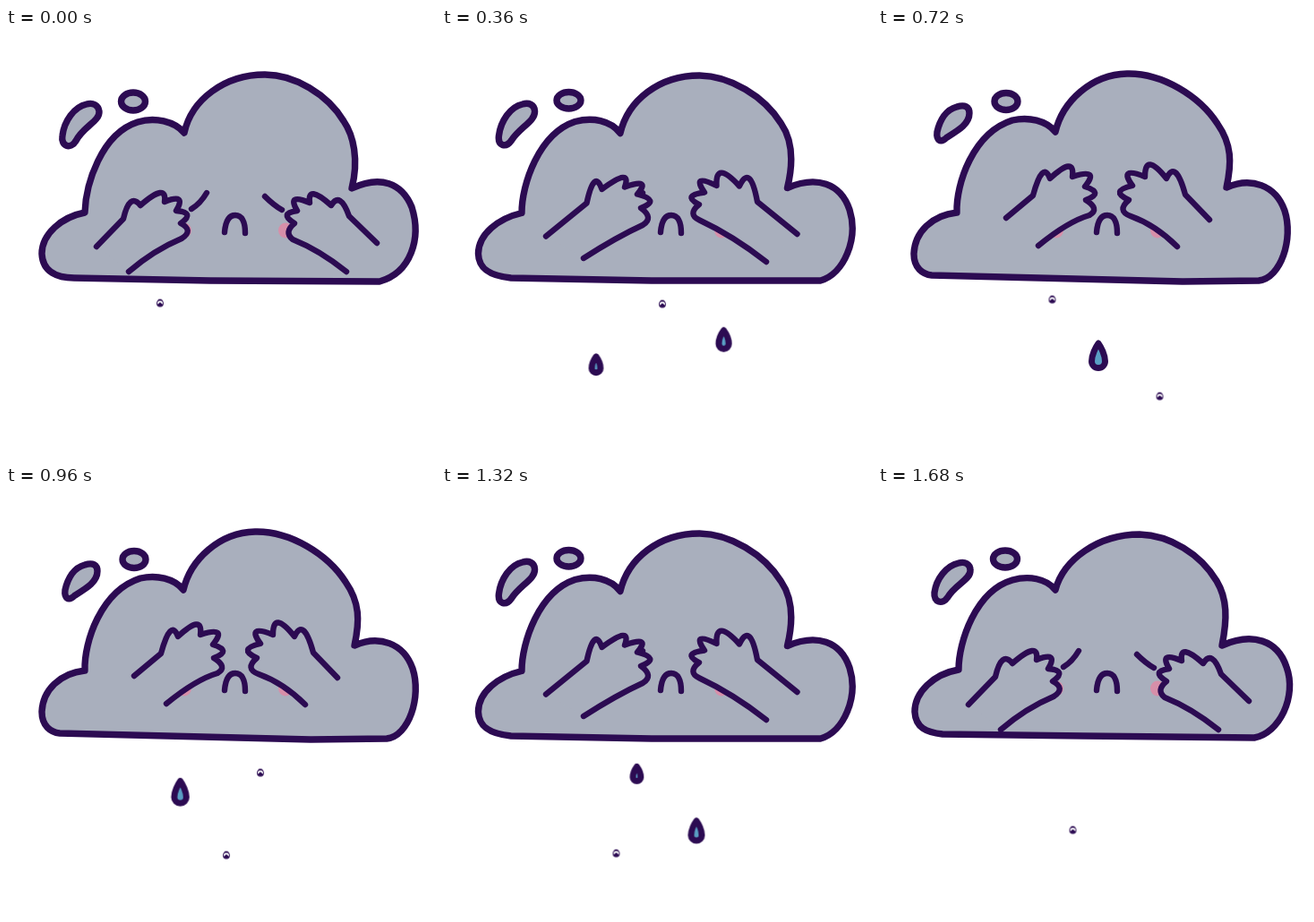
Animation, 480 px wide and 480 px high, one loop 1.74 s. Source, as an HTML page without scripts:

```html
<!DOCTYPE html>
<html lang="en">
<head>
<meta charset="utf-8">
<title>Crying cloud</title>
<style>
html, body { margin: 0; width: 100%; height: 100%; overflow: hidden; background: #fff; }
svg { display: block; width: 100%; height: 100%; }

path { fill: #a9afbd; stroke: #2c0b52; stroke-width: 6.4; stroke-linecap: round; stroke-linejoin: round; }
.cloud { stroke-width: 7.4; animation: wobble 1740ms steps(2) infinite; }
.arms { animation: rub 1740ms steps(2) infinite; }
.line { fill: none; }
.blush { fill: #d78fa9; }

/* Two drawings per key pose: 120 ms each */
@keyframes wobble {
  0% { d: path("M88 206C89 175 106 118 147 105C166 99 188 104 199 117C207 80 244 52 289 52C322 52 359 74 377 104C388 120 394 147 386 179C418 164 442 173 453 200C464 235 452 273 417 283L228 282L76 279C58 279 41 273 40 252C40 230 62 211 88 206ZM104 93C105 104 86 110 78 126C72 136 61 132 63 120C65 104 76 88 90 85C97 83 103 86 104 93ZM128.5 82A13.5 10 0 1 1 155.5 82A13.5 10 0 1 1 128.5 82Z"); }
  13.793%, 82.758% { d: path("M88 207C88 175 108 117 147 105C166 100 186 102 198 117C207 80 244 52 290 52C322 53 359 74 377 104C389 122 394 148 385 179C418 164 446 173 456 204C466 235 448 273 420 282L240 280L78 279C56 277 42 271 41 252C41 230 62 212 88 207ZM104 93C105 104 86 110 78 126C72 136 61 132 63 120C65 104 76 88 90 85C97 83 103 86 104 93ZM128.5 81.5A13.5 9.5 0 1 1 155.5 81.5A13.5 9.5 0 1 1 128.5 81.5Z"); }
  27.586%, 68.965% { d: path("M90 206C90 174 108 119 150 104C170 99 190 104 200 118C208 82 240 54 285 54C321 54 360 78 380 109C392 126 392 148 386 178C418 165 444 173 454 202C464 235 450 276 425 282L228 284L76 279C56 277 40 270 40 252C40 230 64 213 90 206ZM103 92C104 104 87 112 77 125C70 133 63 131 64 120C66 104 76 88 90 85C97 83 103 85 103 92ZM127.5 80A13.5 9 0 1 1 154.5 80A13.5 9 0 1 1 127.5 80Z"); }
  41.379%, 55.172% { d: path("M88 206C87 174 106 117 150 103C168 99 188 103 198 116C206 82 238 52 278 51C317 50 359 76 379 107C395 130 395 150 389 178C416 166 444 175 454 204C464 235 450 279 425 282L340 283L60 276C50 275 40 268 40 252C41 228 60 209 88 206ZM102 95C102 107 90 114 77 122C69 130 65 124 66 116C69 103 76 91 88 88C97 85 102 88 102 95ZM130 82A13 9.5 0 1 1 156 82A13 9.5 0 1 1 130 82Z"); }
  96.551%, 100% { d: path("M90 205C90 174 109 117 150 105C168 100 188 103 198 116C207 82 246 54 292 54C326 55 360 76 378 106C390 126 390 148 384 178C418 163 446 172 456 202C468 235 448 276 420 281L230 279L72 277C54 275 42 270 41 252C41 230 62 210 90 205ZM103 94C104 104 86 110 78 124C72 133 62 130 63 119C65 104 76 89 90 86C97 84 103 87 103 94ZM128.5 81.5A13.5 9.5 0 1 1 155.5 81.5A13.5 9.5 0 1 1 128.5 81.5Z"); }
}

@keyframes rub {
  0%, 96.551%, 100% { d: path("M101 244L131 213Q138 183 150 198Q180 172 177 194Q202 184 190 204Q212 206 195 218Q210 226 196 235Q165 248 137 272M414 240L383 210Q373 182 363 198Q336 174 339 195Q313 184 325 204Q304 207 322 218Q310 228 320 236Q350 248 380 272"); }
  13.793%, 82.758% { d: path("M102 243L148 207Q156 166 165 192Q204 168 191 189Q218 178 205 194Q234 201 212 210Q226 222 212 231Q176 248 138 272M412 239L362 201Q356 156 342 185Q312 156 315 186Q288 170 302 191Q276 192 294 202Q281 212 293 219Q340 242 380 273"); }
  27.586%, 68.965% { d: path("M130 222L175 184Q184 147 192 168Q220 142 217 166Q250 156 231 177Q255 184 232 192Q248 202 236 209Q215 218 178 242M381 221L342 187Q332 146 322 168Q298 138 298 166Q268 154 284 176Q258 182 280 192Q266 204 282 210Q310 222 344 249"); }
  41.379%, 55.172% { d: path("M143 212L173 187Q184 147 192 168Q220 142 217 166Q248 156 231 177Q253 184 232 192Q248 202 236 209Q212 216 179 243M370 214L343 186Q332 146 322 168Q298 138 298 166Q268 154 284 176Q258 182 280 192Q266 204 282 210Q310 220 334 244"); }
}

/* Each drop grows and shrinks; --at is its first slot of 120 ms */
.drop { animation: fall 1740ms step-end calc(var(--at) * 120ms - 1860ms) infinite; }
#tear { fill: #5a9fc4; stroke-width: 7; vector-effect: non-scaling-stroke; }
@keyframes fall {
  0% { opacity: var(--in, 0); transform: translate(var(--x), calc(var(--y0) - 14px)) scale(.06); }
  6.8965% { opacity: 1; transform: translate(var(--x), var(--y0)) scale(var(--k0, .06)); animation-timing-function: steps(2); }
  20.6896% { opacity: 1; transform: translate(var(--x), var(--y1)) scale(var(--k1, 1)); animation-timing-function: steps(2); }
  34.4827% { opacity: 1; transform: translate(var(--x), var(--y2)) scale(var(--k2, .06)); }
  41.3793% { opacity: var(--out, 0); transform: translate(var(--x), var(--y3, 0px)) scale(.06); }
  48.2758%, 100% { opacity: 0; transform: translate(var(--x), var(--y3, 0px)) scale(.06); }
}
.late { animation: late 1740ms step-end infinite; }
@keyframes late { 0% { opacity: 0; } 50%, 100% { opacity: 1; } }

.d1 { --at: 0; --x: 172px; --y0: 307px; --y1: 347px; --y2: 405px; --y3: 415px; --k2: .3; --out: 1; }
.d2 { --at: 2; --x: 314.5px; --y0: 326px; --y1: 370px; --y2: 411px; --k0: .5; --in: 1; }
.d3 { --at: 4; --x: 246px; --y0: 322px; --y1: 366px; --y2: 412px; --k0: .45; --in: 1; }
.d4 { --at: 6; --x: 194.5px; --y0: 303px; --y1: 342px; --y2: 393px; --k1: .9; --k2: .3; --y3: 410px; --out: 1; }
.d5 { --at: 8; --x: 284px; --y0: 320px; --y1: 355px; --y2: 415px; --k2: .6; --y3: 432px; --out: 1; }
.d6 { --at: 10; --x: 217.5px; --y0: 301px; --y1: 342px; --y2: 384px; --k0: .22; --k1: .95; }
</style>
</head>
<body>
<svg viewBox="0 0 480 480">
  <defs>
    <path id="tear" d="M0-14C3-10 7.5-1 7.5 6A7.5 7.5 0 0 1-7.5 6C-7.5-1-3-10 0-14Z"/>
  </defs>
  <path class="cloud"/>
  <ellipse class="blush" cx="199" cy="226" rx="8" ry="8.5"/>
  <ellipse class="blush" cx="312" cy="226" rx="8" ry="8.5"/>
  <path class="line" d="M224 184Q217 196 207 202M289 188Q299 198 308 203M244 228C245 216 249 209 256 209C263 209 267 216 267 229"/>
  <path class="arms"/>
  <use class="drop d1" href="#tear"/>
  <use class="drop d2" href="#tear"/>
  <use class="drop d3" href="#tear"/>
  <use class="drop d4" href="#tear"/>
  <use class="drop d5" href="#tear"/>
  <g class="late"><use class="drop d6" href="#tear"/></g>
</svg>
</body>
</html>
```
